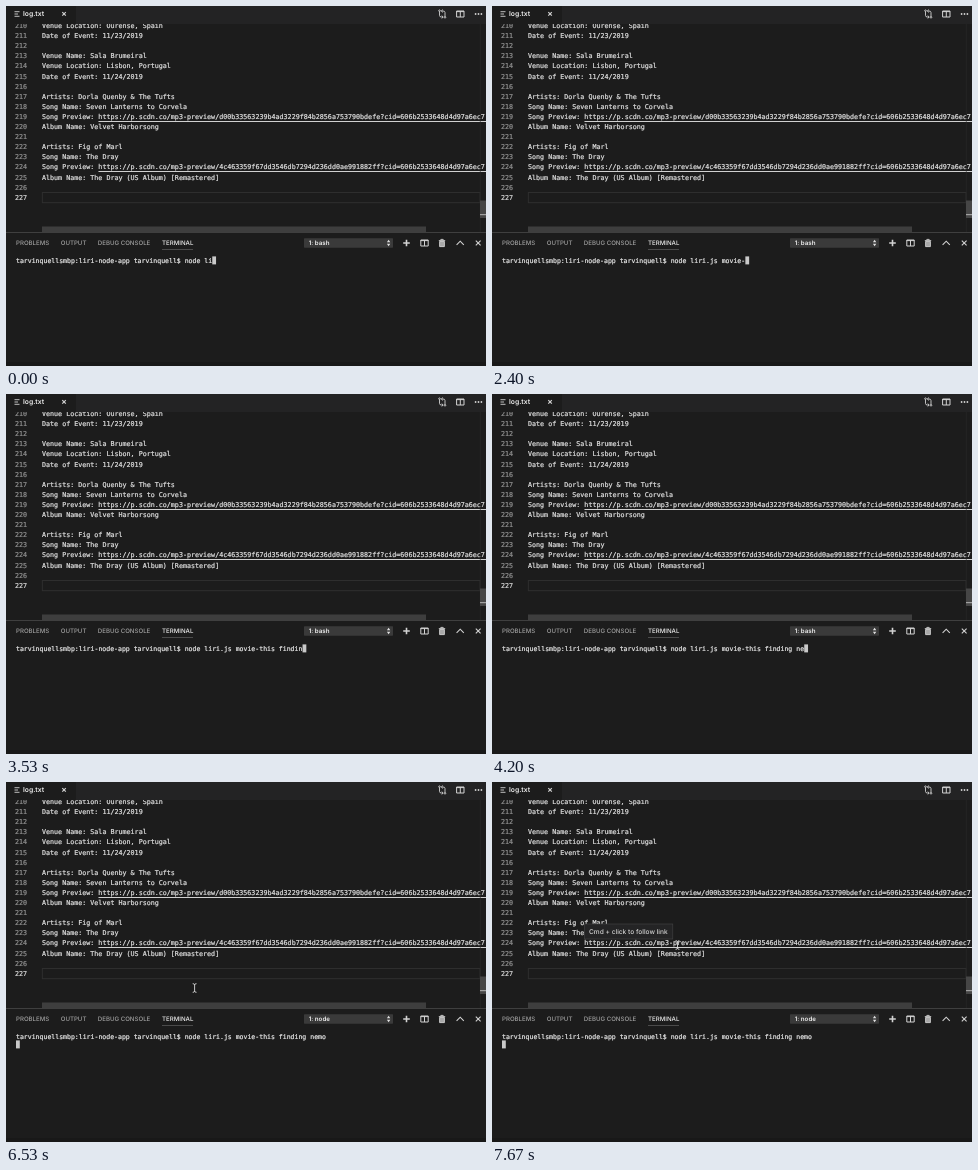
Animation of 480 by 360 pixels, one loop 8 s. Source, as an HTML page:

```html
<!DOCTYPE html>
<html lang="en">
<head>
<meta charset="utf-8">
<title>Editor and terminal</title>
<style>
  html, body { margin: 0; width: 100%; height: 100%; overflow: hidden; background: #1c1c1c; }
  svg { display: block; width: 480px; height: 360px; }
  text { white-space: pre; text-rendering: geometricPrecision; stroke-width: .22px; }
  .code { font: 6.7px "DejaVu Sans Mono", monospace; fill: #dedede; stroke: #dedede; }
  .term { font: 6.52px "DejaVu Sans Mono", monospace; fill: #e6e6e6; stroke: #e6e6e6; }
  .num { fill: #8e8e8e; stroke: #8e8e8e; text-anchor: end; }
  .now { fill: #d6d6d6; stroke: #d6d6d6; }
  .ui { font: 500 6.13px Inter, sans-serif; fill: #a0a0a0; }
  .on { fill: #f0f0f0; }
  .bold { font-weight: 600; }
  .icon { fill: none; stroke: #d2d2d2; }
</style>
</head>
<body>
<svg viewBox="0 0 480 360">
  <rect width="480" height="360" fill="#1c1c1c"/>

  <!-- editor -->
  <rect x="36.3" y="186.5" width="437.7" height="10.2" fill="none" stroke="#303030" stroke-width=".9"/>
  <g id="lines"></g>
  <path d="M474.3 18V226" stroke="#2a2a2a" stroke-width=".6"/>
  <rect x="474" y="194.5" width="6" height="17.5" fill="#464646"/>
  <rect x="474" y="208" width="6" height="1.2" fill="#a0a0a0"/>
  <rect x="36" y="220.5" width="384" height="5.5" fill="#3e3e3e"/>

  <!-- tab bar -->
  <rect width="480" height="18" fill="#232324"/>
  <rect width="70" height="18" fill="#1c1c1c"/>
  <path class="icon" d="M8.5 5.7H13.5M8.5 8H12M8.5 10.3H13.5" stroke-width=".9"/>
  <text class="ui on bold" x="17" y="10.4" style="font-size:6.8px">log.txt</text>
  <path class="icon" d="M56.3 6.2l3.5 3.5m0-3.5l-3.5 3.5" stroke-width="1.2"/>
  <g class="icon" stroke-width=".9">
    <path d="M433.5 5.5V9.5Q433.5 11 435.5 11H437M435.7 9.6L437.2 11 435.7 12.4M439 10.5V6.5Q439 5 437 5H435.5M436.8 3.6L435.3 5 436.8 6.4"/>
    <circle cx="433.5" cy="4.7" r=".8"/>
    <circle cx="439" cy="11.3" r=".8"/>
  </g>
  <path id="split" class="icon" d="M450.6 5H458V11H450.6ZM454.3 5V11M450.6 5.6H458" stroke-width="1"/>
  <g fill="#d2d2d2">
    <circle cx="469.6" cy="8" r=".9"/><circle cx="472.5" cy="8" r=".9"/><circle cx="475.4" cy="8" r=".9"/>
  </g>

  <!-- panel -->
  <rect y="226" width="480" height="134" fill="#1c1c1c"/>
  <path d="M0 226.5H480" stroke="#484848" stroke-width=".8"/>
  <g class="ui">
    <text x="10" y="239.2">PROBLEMS</text>
    <text x="54.7" y="239.2">OUTPUT</text>
    <text x="91.8" y="239.2">DEBUG CONSOLE</text>
    <text class="on" x="156" y="239.2">TERMINAL</text>
  </g>
  <path d="M156 243.5H187" stroke="#6c6c6c" stroke-width=".6"/>
  <rect x="298" y="232.3" width="89" height="9.4" rx=".6" fill="#3a3a3a"/>
  <text id="shell" class="ui on bold" x="302.7" y="239.2" style="font-size:6.2px"></text>
  <path d="M380.9 236.2L382.6 233.8 384.3 236.2ZM380.9 237.8L382.6 240.2 384.3 237.8Z" fill="#e0e0e0"/>
  <g class="icon">
    <path d="M397.2 237H403.8M400.5 233.7V240.3" stroke-width="1.6"/>
    <use href="#split" x="-35.8" y="229"/>
    <path d="M432.8 234.6H439.2M434.8 234.4V233.4H437.2V234.4" stroke-width=".9"/>
    <path d="M433.6 235.4H438.4V240.6H433.6Z" fill="#a8a8a8" stroke-width=".9"/>
    <path d="M450.6 238.8L454.2 235.2 457.8 238.8" stroke-width="1.1"/>
    <path d="M469.8 234.6l4.8 4.8m0-4.8l-4.8 4.8" stroke-width="1.1"/>
  </g>

  <!-- terminal -->
  <text id="cmd" class="term" x="10" y="256.9"></text>
  <rect id="caret" width="3.8" height="8" fill="#c9c9c9"/>
  <rect y="356" width="480" height="4" fill="#181818"/>

  <!-- hover hint and mouse -->
  <g id="hint">
    <rect x="92.4" y="142" width="88.4" height="15" fill="#242425" stroke="#444" stroke-width=".6"/>
    <text class="ui" x="97" y="151.9" style="font-size:6.6px;fill:#d4d4d4">Cmd + click to follow link</text>
  </g>
  <path id="mouse" d="M-1.9-4.3Q0-4.3 0-3.2Q0-4.3 1.9-4.3M0-3.2V3.2M-1.9 4.3Q0 4.3 0 3.2Q0 4.3 1.9 4.3" fill="none" stroke="#dcdcdc" stroke-width=".9"/>
</svg>

<script>
const LOOP = 8000;
const EDITOR_CHAR = 6.7 * 0.602, TERM_CHAR = 6.52 * 0.602;
const PROMPT = 'tarvinquellsmbp:liri-node-app tarvinquell$ ';
const COMMAND = 'node liri.js movie-this finding nemo';
const PREVIEW = 'https://p.scdn.co/mp3-preview/';
const CLIENT = '?cid=606b2533648d4d97a6ec7';
const $ = id => document.getElementById(id);

const LINES = [
  'Venue Location: Ourense, Spain',
  'Date of Event: 11/23/2019',
  '',
  'Venue Name: Sala Brumeiral',
  'Venue Location: Lisbon, Portugal',
  'Date of Event: 11/24/2019',
  '',
  'Artists: Dorla Quenby & The Tufts',
  'Song Name: Seven Lanterns to Corvela',
  'Song Preview: ' + PREVIEW + 'd00b33563239b4ad3229f84b2856a753790bdefe' + CLIENT,
  'Album Name: Velvet Harborsong',
  '',
  'Artists: Fig of Marl',
  'Song Name: The Dray',
  'Song Preview: ' + PREVIEW + '4c463359f67dd3546db7294d236dd0ae991882ff' + CLIENT,
  'Album Name: The Dray (US Album) [Remastered]',
  '',
  ''
];

// [time, characters of the command typed so far]
const TYPING = [
  [0, 7], [130, 8], [530, 9], [600, 13], [1870, 14], [1930, 15],
  [2070, 16], [2200, 17], [2270, 18], [2400, 19],
  [2600, 20], [2670, 21], [2730, 22], [2870, 23], [2930, 24],
  [3070, 25], [3130, 26], [3270, 27], [3330, 28],
  [3470, 29], [3530, 30], [3670, 32],
  [4000, 33], [4130, 34], [4270, 35], [4400, 36]
];
const ENTER = 4600, RUNNING = 4800;

// [time, x, y]
const MOUSE = [
  [6530, 188.6, 206], [6600, 188, 198], [6670, 185.5, 180],
  [6730, 183.5, 168], [6800, 186, 162],
  [7600, 186, 164], [7670, 185.5, 163]
];
const HINT = [[0, 0], [7130, 0.5], [7200, 1]];

const at = (steps, t) => steps.filter(s => s[0] <= t).pop();

function add(tag, attrs, content = '') {
  const el = document.createElementNS('http://www.w3.org/2000/svg', tag);
  for (const name in attrs) el.setAttribute(name, attrs[name]);
  el.textContent = content;
  $('lines').append(el);
}

LINES.forEach((line, i) => {
  const y = 22 + i * 10.1;
  const last = i === LINES.length - 1;
  add('text', { class: 'code num' + (last ? ' now' : ''), x: 21, y }, 210 + i);
  add('text', { class: 'code', x: 36, y }, line);
  const link = line.indexOf('https');
  if (link >= 0) {
    add('rect', { x: 36 + link * EDITOR_CHAR, y: Math.round(y) + 2, width: 400, height: 1, fill: '#d0d0d0' });
  }
});

function draw(t) {
  const typed = PROMPT + COMMAND.slice(0, at(TYPING, t)[1]);
  const entered = t >= ENTER;
  $('cmd').textContent = typed;
  $('caret').setAttribute('x', 10 + (entered ? 0 : typed.length * TERM_CHAR));
  $('caret').setAttribute('y', entered ? 258.4 : 250.4);
  $('shell').textContent = t >= RUNNING ? '1: node' : '1: bash';
  $('hint').setAttribute('opacity', at(HINT, t)[1]);

  const m = at(MOUSE, t);
  $('mouse').setAttribute('visibility', m ? 'visible' : 'hidden');
  if (m) $('mouse').setAttribute('transform', `translate(${m[1]} ${m[2]})`);
}

const start = performance.now();
function tick() {
  draw((performance.now() - start) % LOOP);
  requestAnimationFrame(tick);
}
tick();
</script>
</body>
</html>
```
